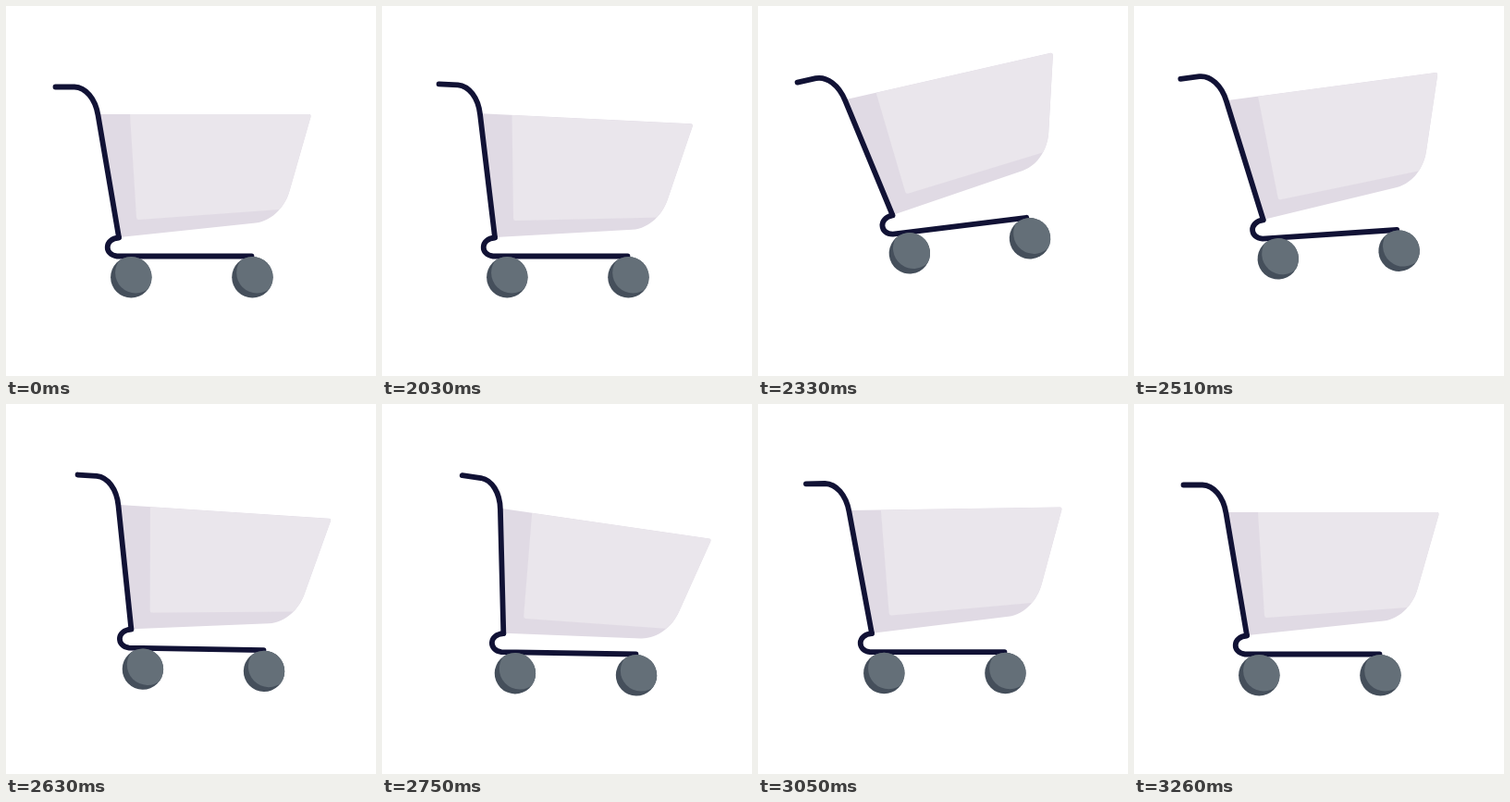
Write an HTML page that moves like this. It is 400x400 px and loops after 3.32 s.

```html
<!DOCTYPE html>
<html lang="en">
<head>
<meta charset="utf-8">
<title>Shopping cart</title>
<style>
  html, body { margin: 0; width: 100%; height: 100%; overflow: hidden; background: #fff; }
  svg { display: block; width: 100%; height: 100%; }
  .frame { fill: none; stroke: #111235; stroke-width: 5.8; stroke-linecap: round; stroke-linejoin: round; }
</style>
</head>
<body>
<svg viewBox="0 0 400 400">
  <defs>
    <path id="shell" d="M101 117H327.5Q330 117 329.4 120L306.5 200C302 216 289 232 270 234.5L123 250Z"/>
    <clipPath id="inShell"><use href="#shell"/></clipPath>
    <clipPath id="inWheel"><circle r="22.2"/></clipPath>
    <g id="wheel">
      <circle r="22.2" fill="#454f5b"/>
      <circle cx="5" cy="-5" r="22.2" fill="#646f78" clip-path="url(#inWheel)"/>
    </g>
  </defs>
  <g id="cart">
    <g id="basket">
      <use href="#shell" fill="#e0dae4"/>
      <path fill="#eae6ec" clip-path="url(#inShell)" d="M134 110V117L141 228.5Q141.3 231.2 143.5 231L340 216.8V110Z"/>
      <path class="frame" d="M53.5 87.5H74C86 88 96.5 100 99.5 118L122 250"/>
    </g>
    <path class="frame" d="M122 250.5C106 251.5 106 269 120 270.5H265.5"/>
    <use href="#wheel" x="135.3" y="293.3"/>
    <use href="#wheel" x="266.4" y="293.3"/>
  </g>
</svg>
<script>
const LOOP = 3320, START = 2030, END = 3260, STEP = 30;
const APEX = 2345;
const PIVOT = '122 250';

const swing = u => (1 - Math.cos(Math.PI * u ** 1.4)) / 2;
const glide = u => 1 - (1 - u) ** 1.25;

// Moves through [time, value] turning points, easing each stretch.
function move(t, ease, ...points) {
  let value = points[0][1];
  for (let i = 1; i < points.length; i++) {
    const [from, a] = points[i - 1], [to, b] = points[i];
    const u = Math.min(1, (t - from) / (to - from));
    if (u > 0) value = a + (b - a) * ease(u);
  }
  return value;
}

const shift = t => move(t, glide, [START, 0], [APEX, 23.9], [3110, 0]);
const lift = t => move(t, swing, [START, 0], [APEX, -24.3], [2713, -2.3], [3020, -2.3], [END, 0]);
const tilt = t => move(t, swing, [START, 0], [APEX, -7.1], [2640, 1], [3000, 0]);
// The basket is already leaning when the hop starts, then rocks to rest.
const lean = t => move(t, swing, [1933, 0], [2110, 7.2], [2350, -6.2], [2750, 7.3], [2954, -2.3], [3098, 0]);

const cart = document.getElementById('cart');
const basket = document.getElementById('basket');

function draw(ms) {
  const now = ms % LOOP;
  const t = now < START ? END : Math.min(END, START + Math.floor((now - START) / STEP) * STEP);
  cart.setAttribute('transform', `translate(${shift(t)} ${lift(t)}) rotate(${tilt(t)} ${PIVOT})`);
  basket.setAttribute('transform', `rotate(${lean(t)} ${PIVOT})`);
}

const begin = performance.now();
function tick() {
  draw(performance.now() - begin);
  requestAnimationFrame(tick);
}
tick();
</script>
</body>
</html>
```
